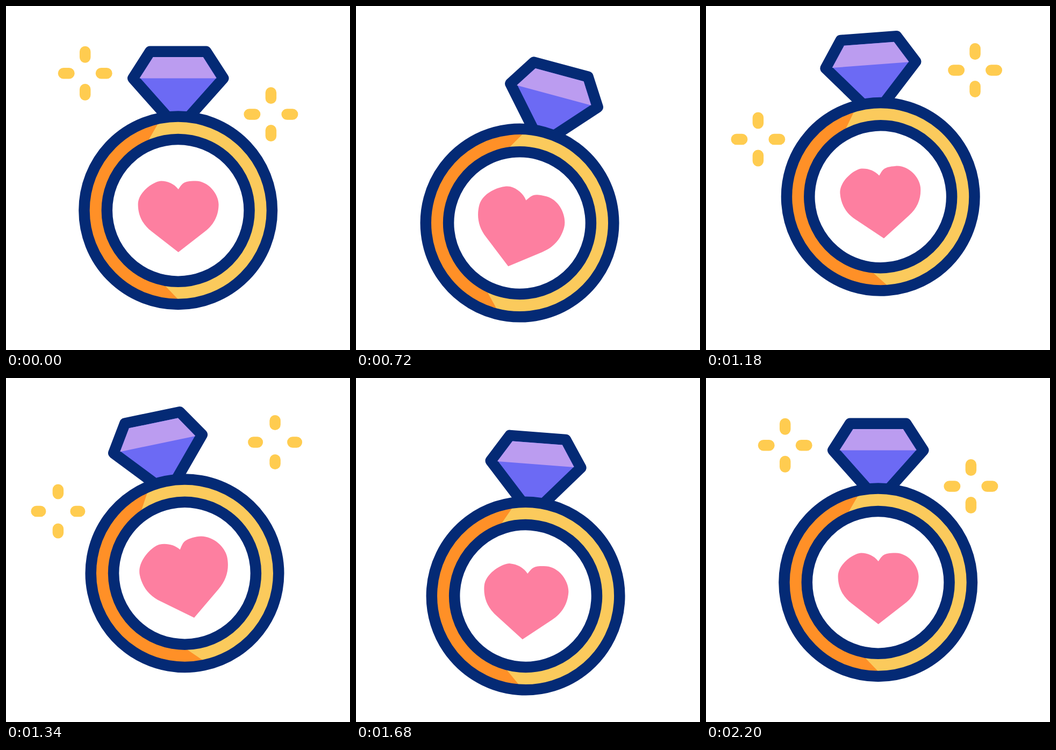
These frames come from a looping animation (640 px wide and 640 px high, 2.4 s). An HTML page:

```html
<!DOCTYPE html>
<html lang="en">
<head>
<meta charset="utf-8">
<title>Ring</title>
<style>
  html, body { margin: 0; width: 100%; height: 100%; overflow: hidden; background: #fff; }
  svg { display: block; width: 100vw; height: 100vh; }
  .outline { stroke: #042a75; stroke-width: 20.5; stroke-linejoin: round; }
</style>
</head>
<body>
<svg viewBox="0 0 640 640">
  <path id="sparkles" fill="none" stroke="#ffcc50" stroke-width="20.5" stroke-linecap="round"/>
  <g id="ring">
    <path class="outline" d="M236.2 134.5 268 84.8H372.2L404.4 134.5 320.3 229Z" fill="#6c6af4"/>
    <path d="M248.5 134.5 273.8 95H366.7L391.6 134.5Z" fill="#bb9cf0"/>
    <circle cx="320.2" cy="380.3" r="174.75" fill="#fbca5c"/>
    <path d="M282.8 219A166 166 0 0 0 321 546.5L294.5 519 264.2 251Z" fill="#ff9027"/>
    <circle class="outline" cx="320.2" cy="380.3" r="174.75" fill="none"/>
    <circle class="outline" cx="320.2" cy="380.3" r="132.4" fill="#fff"/>
    <path id="heart" fill="#fd7fa0" d="M0-51C-7.5-61-20-66.5-32-66.5S-75-47-75-23C-75-4-67.5 14-49.5 27.5
      L0 66 49.5 27.5C67.5 14 75-4 75-23S56-66.5 32-66.5 7.5-61 0-51Z"/>
  </g>
</svg>
<script>
const LOOP = 2400, REST = 200, ACTIVE = 2000, STEP = 20;
const [sparkles, ring, heart] = ["sparkles", "ring", "heart"].map(id => document.getElementById(id));

const smooth = u => u * u * (3 - 2 * u);
const ramp = (t, from, to) => smooth(Math.min(1, Math.max(0, (t - from) / (to - from))));
// Eased triangle wave: 0 at even x, 1 at odd x.
const wave = x => smooth(1 - Math.abs(1 - x % 2));

// The first and last swings of the bounce begin and end at rest, half as far.
function bounce(t) {
  const x = t / 500, w = wave(x);
  return 25.6 * (x < 1 || x > 3 ? w : 2 * w - 1);
}

function tilt(t) {
  return 15.4 * ramp(t, 0, 570) - 28.2 * ramp(t, 570, 1215)
    + 20.2 * ramp(t, 1215, 1565) - 7.4 * ramp(t, 1565, ACTIVE);
}

// Two beats, then a pause, once a second.
const beat = phase => 1 + (phase < 800 ? 0.136 * wave(phase / 200) : 0);

function sparkle(x, y, from, to) {
  if (to - from < 0.001) return "";
  const a = 29.75 + 10.5 * from, b = 29.75 + 10.5 * to;
  return `M${x + a} ${y}H${x + b}M${x - a} ${y}H${x - b}M${x} ${y + a}V${y + b}M${x} ${y - a}V${y - b}`;
}

// The dashes shrink outward, then grow from the inside at the other place.
function drawSparkles(t, phase) {
  const leaving = phase < 500;
  const from = leaving ? ramp(phase, 0, 400) : 0;
  const to = leaving ? 1 : ramp(phase, 600, 1000);
  const moved = t >= 500 && t < 1500;
  const places = moved ? [[96.9, 248], [500.6, 119.5]] : [[147.2, 125.2], [492.9, 201.5]];
  sparkles.setAttribute("d", places.map(([x, y]) => sparkle(x, y, from, to)).join(""));
}

function draw(t) {
  const phase = t % 1000;
  ring.setAttribute("transform", `translate(0 ${bounce(t)}) rotate(${tilt(t)} 320.2 320)`);
  heart.setAttribute("transform", `translate(320.6 392) scale(${beat(phase)})`);
  drawSparkles(t, phase);
}

const start = performance.now();
function tick() {
  const t = Math.floor((performance.now() - start) % LOOP / STEP) * STEP - REST;
  draw(Math.min(ACTIVE, Math.max(0, t)));
  requestAnimationFrame(tick);
}
draw(0);
requestAnimationFrame(tick);
</script>
</body>
</html>
```
